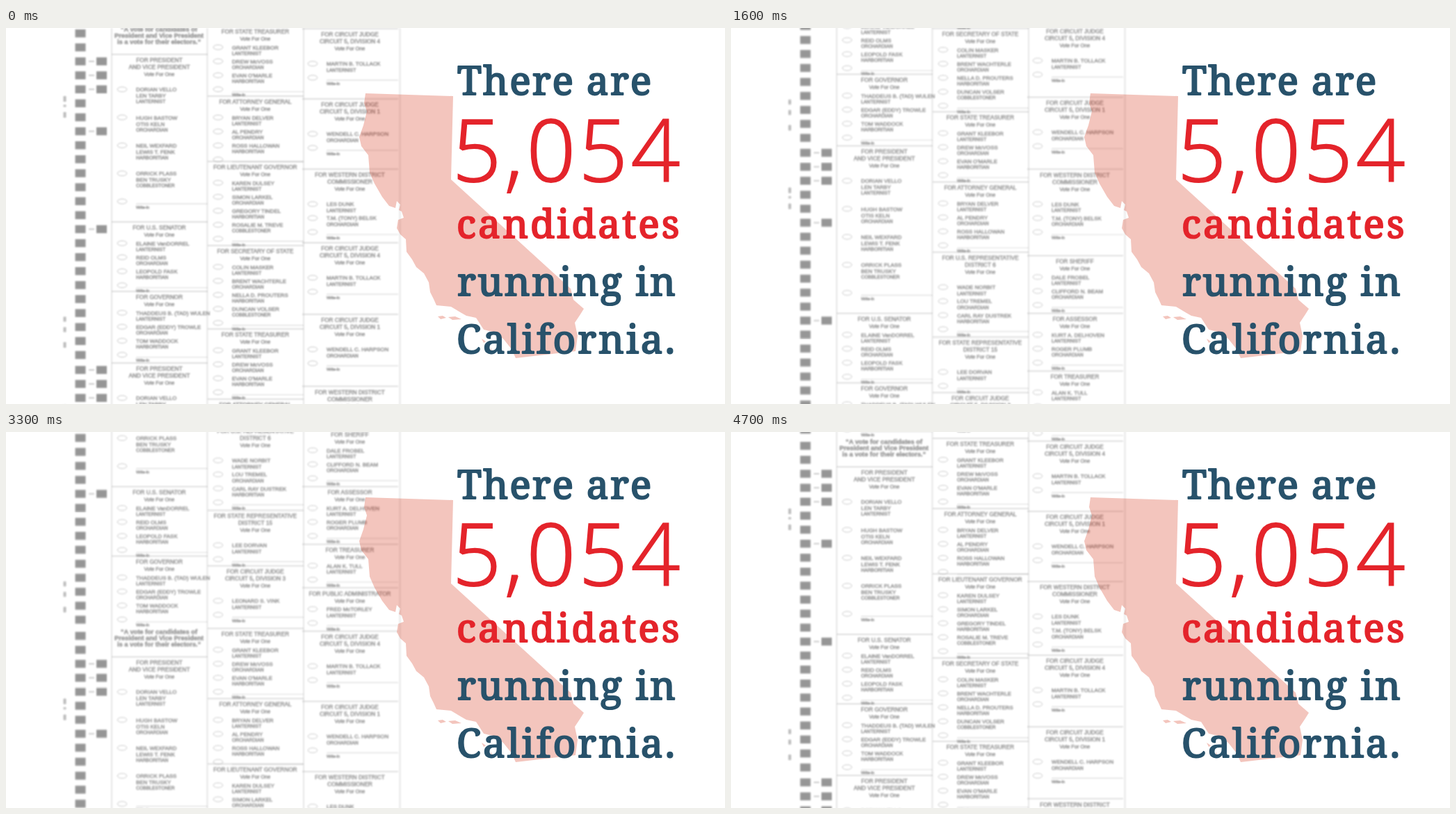
Recreate the animation shown at these times as an HTML page. Size 1034 by 541 pixels, loop 4.8 s.

```html
<!DOCTYPE html>
<html lang="en">
<head>
<meta charset="utf-8">
<title>Candidates running in California</title>
<style>
  html, body { margin: 0; width: 100%; height: 100%; overflow: hidden; background: #fff; }
  #stage { position: relative; width: 100%; height: 100%; overflow: hidden; contain: strict; }
  svg { position: absolute; left: 0; top: 0; display: block; }

  #ballot {
    opacity: .41;
    filter: blur(1.1px);
    font: 7.9px "Liberation Sans", Arial, sans-serif;
    animation: scroll 4.8s steps(48) infinite;
  }
  @keyframes scroll { to { transform: translateY(-937.44px); } }

  #ballot text { stroke: #000; stroke-width: .5; }
  .title { font-size: 8.2px; text-anchor: middle; }
  .vote { font-size: 7.4px; text-anchor: middle; }
  .note { font-size: 9.3px; font-weight: bold; text-anchor: middle; }
  .party { font-size: 6.8px; }
  .writein { font-size: 5.6px; }
  .oval { fill: none; stroke: #000; stroke-width: 1; opacity: .55; }
  .rule { stroke: #000; stroke-width: 1.4; opacity: .42; }
  .rule.thin { opacity: .3; }
  .rule.side { stroke-width: 2; opacity: .25; }

  .slab {
    font: 57px "Noto Serif", serif;
    fill: #28526b; stroke: #28526b; stroke-width: 2.1; stroke-linejoin: round;
  }
  .slab.red { fill: #e4242b; stroke: #e4242b; }
  .count {
    font: 300 123px "Open Sans", sans-serif; letter-spacing: 5px;
    fill: #e4242b; stroke: #e4242b; stroke-width: 2;
  }
</style>
</head>
<body>
<div id="stage">
<svg id="ballot" width="1034" height="1490">
  <g id="strip"></g>
  <use href="#strip" y="930"/>
</svg>

<svg width="1034" height="541">
  <g fill="#d74126" fill-opacity=".3">
    <path d="M517 94L643 98L640 218L812 375L816 391L831 404L826 412L818 424L822 443L819 465L733 475
      L727 462L715 447L700 437L687 434L676 417L662 414L655 410L640 401L619 399L615 390L610 380L608 366
      L601 353L590 344L584 333L576 322L575 304L567 297L562 288L564 276L572 273L569 264L565 262L567 254
      L562 249L560 259L551 256L541 243L530 224L523 208L521 183L511 170L508 157L514 140L519 120L515 108Z"/>
    <path d="M621 415l7 -1l5 3l-8 2zM636 416l10 -1l9 4l-13 1zM684 447l6 4l-3 2zM697 460l4 7l-3 1z"/>
  </g>
  <g class="slab">
    <text x="649" y="96" letter-spacing="2">There are</text>
    <text x="649" y="385" letter-spacing="2.4">running in</text>
    <text x="648" y="468" letter-spacing="2.9">California.</text>
  </g>
  <text class="count" x="642" y="221">5,054</text>
  <text class="slab red" x="648" y="302" letter-spacing="3">candidates</text>
</svg>
</div>

<script>
const strip = document.getElementById('strip');
const PERIOD = 930;
const REPEAT = 444;   // the first column's page appears twice per strip
const ROW = 20.15;
const PARTIES = ['LANTERNIST', 'ORCHARDIAN', 'HARBORITIAN', 'COBBLESTONER'];

function add(tag, attrs, content = '') {
  const node = document.createElementNS('http://www.w3.org/2000/svg', tag);
  for (const key in attrs) node.setAttribute(key, attrs[key]);
  node.textContent = content;
  strip.append(node);
}
const label = (x, y, cls, content) => add('text', { x, y: y + 3, class: cls }, content);
const line = (x1, y1, x2, y2, cls = '') => add('line', { x1, y1, x2, y2, class: 'rule ' + cls });
const box = (x, y, width, height, opacity = 1) => add('rect', { x, y: y - height / 2, width, height, opacity });
const oval = (x, y) => add('ellipse', { cx: x, cy: y, rx: 6.8, ry: 3.5, class: 'oval' });

// One race: title lines split by "|", running mates split by "/".
function race(left, y, title, names, firstParty = 0) {
  const middle = left + 68.5, lines = title.split('|');
  const tickets = names.split(',').map(name => name.split('/'));
  const step = ROW * tickets[0].length;
  const voteY = y + lines.length * 10;
  line(left, y - 8, left + 138, y - 8);
  lines.forEach((part, i) => label(middle, y + i * 10.2, 'title', part));
  label(middle, voteY, 'vote', 'Vote For One');

  let rowY = voteY + (lines.length > 1 ? 22.3 : 12.7);
  tickets.forEach((ticket, i) => {
    oval(left + 15, rowY);
    ticket.forEach((name, k) => label(left + 35, rowY + k * 9, 'name', name));
    label(left + 35, rowY + ticket.length * 8.7 - .4, 'party', PARTIES[firstParty + i]);
    rowY += step;
  });
  oval(left + 15, rowY);
  line(left + 35, rowY + 3.5, left + 138, rowY + 3.5, 'thin');
  if (!title.includes('ATTORNEY') || y > 500) label(left + 35, rowY + 7.3, 'writein', 'Write-in');
}

// Timing marks and column borders
for (const top of [48, 48 + REPEAT]) {
  for (let k = top < 100 ? -2 : 0; k < 22; k++) {
    const y = top + k * 20.12;
    box(99.5, y, 15, 11.5);
    if ([0, 1, 2, 5, 12].includes(k)) {
      box(119, y, 8, 2, .5);
      box(130, y, 15, 11.5);
    }
  }
  for (const [y, h] of [[54, 8], [64, 3], [77, 8], [371, 7], [386, 7], [408, 8]])
    box(82.5, top + y, 4, h, .65);
}
for (const x of [152, 289.5, 428, 566.5]) line(x, 0, x, PERIOD, 'side');

// First column
['"A vote for candidates of', 'President and Vice President', 'is a vote for their electors."']
  .forEach((part, i) => label(220, 2 + i * 9, 'note', part));
for (const shift of [0, REPEAT]) {
  race(152, 46 + shift, 'FOR PRESIDENT|AND VICE PRESIDENT',
    'DORIAN VELLO/LEN TARBY,HUGH BASTOW/OTIS KELN,NEIL WEXFARD/LEWIS T. FENK,ORRICK PLASS/BEN TRUSKY');
  race(152, 287 + shift, 'FOR U.S. SENATOR', 'ELAINE VanDORREL,REID OLMS,LEOPOLD FASK');
  race(152, 387 + shift, 'FOR GOVERNOR', 'THADDEUS B. (TAD) WULEN,EDGAR (EDDY) TROWLE,TOM WADDOCK');
}

// Second column
for (const y of [5, 441]) {
  race(290, y, 'FOR STATE TREASURER', "GRANT KLEEBOR,DREW McVOSS,EVAN O'MARLE");
  race(290, y + 101, 'FOR ATTORNEY GENERAL', 'BRYAN DELVER,AL PENDRY,ROSS HALLOWAN');
}
race(290, 200, 'FOR LIEUTENANT GOVERNOR', 'KAREN DULSEY,SIMON LARKEL,GREGORY TINDEL,ROSALIE M. TREVE');
race(290, 321, 'FOR SECRETARY OF STATE', 'COLIN MASKER,BRENT WACHTERLE,NELLA D. PROUTERS,DUNCAN VOLSER');
race(290, 643, 'FOR U.S. REPRESENTATIVE|DISTRICT 6', 'WADE NORBIT,LOU TREMEL,CARL RAY DUSTREK');
race(290, 765, 'FOR STATE REPRESENTATIVE|DISTRICT 15', 'LEE DORVAN');
race(290, 845, 'FOR CIRCUIT JUDGE|CIRCUIT 5, DIVISION 3', 'LEONARD S. VINK');

// Third column
for (const [y1, y2, y3] of [[9, 110, 211], [317, 420, 523.5]]) {
  race(426, y1, 'FOR CIRCUIT JUDGE|CIRCUIT 5, DIVISION 4', 'MARTIN B. TOLLACK');
  race(426, y2, 'FOR CIRCUIT JUDGE|CIRCUIT 5, DIVISION 1', 'WENDELL C. HARPSON', 1);
  race(426, y3, 'FOR WESTERN DISTRICT|COMMISSIONER', 'LES DUNK,T.M. (TONY) BELSK');
}
race(426, 648, 'FOR SHERIFF', 'DALE FROBEL,CLIFFORD N. BEAM');
race(426, 731, 'FOR ASSESSOR', 'KURT A. DELHOVEN,ROGER PLUMB');
race(426, 814, 'FOR TREASURER', 'ALAN K. TULL');
race(426, 876.5, 'FOR PUBLIC ADMINISTRATOR', 'FRED McTORLEY');
</script>
</body>
</html>
```
